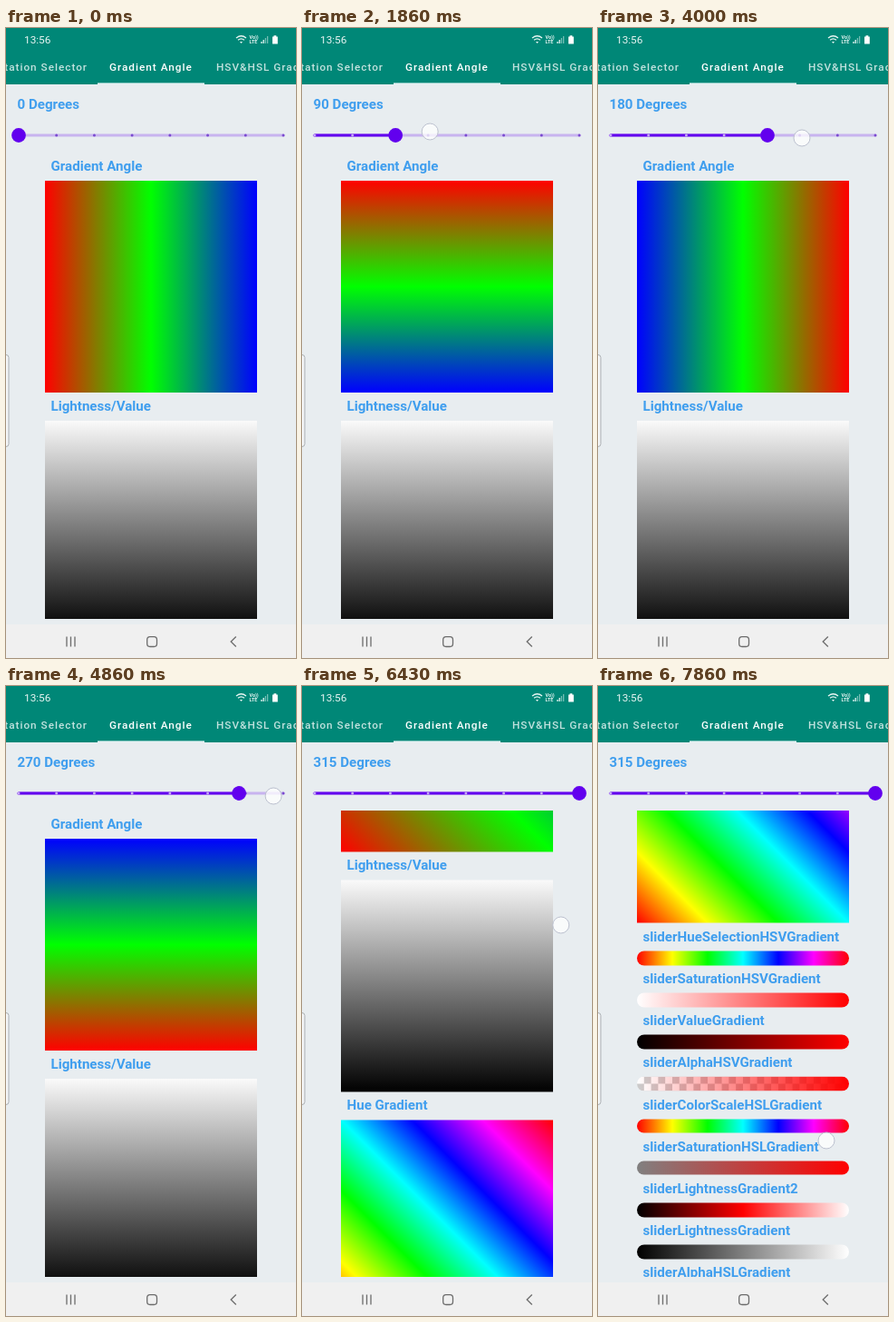
An HTML page that plays this animation: 320x693 px, repeating every 8 s.

```html
<!DOCTYPE html>
<html lang="en">
<head>
<meta charset="utf-8">
<title>Gradient Angle</title>
<style>
  html, body { margin: 0; width: 100%; height: 100%; overflow: hidden; background: #e8edf0; }
  body { position: relative; font-family: Roboto, sans-serif; }
  svg { position: absolute; left: 0; top: 0; }
  .tab { font-size: 11.76px; font-weight: 500; letter-spacing: 1px; fill: #fff; }
  .dim { fill-opacity: .76; }
  .title { font-size: 15.12px; font-weight: 700; color: #3f9eee; fill: #3f9eee; }
  #view { position: absolute; left: 0; top: 137px; width: 320px; height: 513px; overflow: hidden; }
  #list { position: absolute; left: 43px; top: 0; width: 234px; }
  #list .title { line-height: 31px; padding-left: 6.5px; white-space: nowrap; }
  .box { height: 233px; }
  .bar { height: 15.6px; margin-bottom: -.45px; border-radius: 8px; }
</style>
</head>
<body>
<svg width="320" height="693">
  <rect width="320" height="62" fill="#008777"/>
  <text x="20" y="17.3" font-size="11.8" fill="#e9f6f4">13:56</text>
  <g fill="none" stroke="#e9f6f4" stroke-width="1.3">
    <path d="M254 11q5.5-4.5 11 0M256 13.3q3.5-2.8 7 0"/>
    <path d="M258 15h3l-1.500 2z" fill="#e9f6f4" stroke="none"/>
    <path d="M282 17v-2M284.2 17v-4"/>
    <path d="M286.4 17v-6M288.6 17v-8" stroke-opacity=".5"/>
  </g>
  <g font-size="5.4" font-weight="700" fill="#e9f6f4">
    <text x="268.5" y="12">Vo))</text>
    <text x="268.5" y="17.3">LTE</text>
  </g>
  <path d="M295.5 8.200h2.800v1.200h1.500v8h-5.800v-8h1.500z" fill="#fff"/>

  <text class="tab dim" x="90" y="47.3" text-anchor="end">Orientation Selector</text>
  <text class="tab" x="114" y="47.3">Gradient Angle</text>
  <text class="tab dim" x="232" y="47.3">HSV&amp;HSL Gradient</text>
  <rect x="101" y="60.4" width="118" height="1.6" fill="#e6f3f4"/>

  <text id="degrees" class="title" x="12.5" y="88.800"></text>
  <g stroke-width="3.1" stroke-linecap="round">
    <path d="M14 118H306" stroke="#c8b4ef"/>
    <path id="active" stroke="#6200ee"/>
  </g>
  <g id="ticks"></g>
  <circle id="thumb" cy="118" r="7.9" fill="#6200ee"/>
  <circle id="halo" cy="118" r="14.5" fill-opacity=".15"/>

  <rect x="-6" y="359.5" width="9" height="101" rx="3" fill="#f4f6f8" stroke="#a9adb0"/>
  <rect y="656" width="320" height="37" fill="#f0f0f0"/>
  <g fill="none" stroke="#6c6c6c" stroke-width="1.3">
    <path d="M67 669.5v11M71.5 669.5v11M76 669.5v11"/>
    <rect x="155.7" y="669.7" width="10.8" height="10.8" rx="3.2"/>
    <path d="M253.8 669.5l-5.6 5.500 5.6 5.500"/>
  </g>
</svg>
<div id="view"><div id="list"></div></div>
<svg width="320" height="693">
  <circle id="finger" r="9" fill="#fff" fill-opacity=".75" stroke="#bcc1cf"/>
</svg>

<script>
const LOOP = 8000, FPS = 7;
const FIRST = 14, LAST = 306, STEP = (LAST - FIRST) / 7;
const SCROLL_END = 833.5, DRAG = 165, LEAD = 38;
const $ = id => document.getElementById(id);

const hues = 'red, yellow, lime, cyan, blue, magenta, red';
const across = colors => `linear-gradient(90deg, ${colors})`;
const alpha = across('#f000, #f00') +
  ', repeating-conic-gradient(#ccc 0 25%, #fff 0 50%) 0 0 / 15.6px 15.6px';

function addItem(name, kind, background = '') {
  $('list').insertAdjacentHTML('beforeend',
    `<div class="title">${name}</div><div class="${kind}" style="background:${background}"></div>`);
  return $('list').lastElementChild;
}

const angleBox = addItem('Gradient Angle', 'box');
addItem('Lightness/Value', 'box', 'linear-gradient(#fafafa, #000)');
const hueBox = addItem('Hue Gradient', 'box');
const bars = {
  sliderHueSelectionHSVGradient: across(hues),
  sliderSaturationHSVGradient: across('#fff, red'),
  sliderValueGradient: across('#000, red'),
  sliderAlphaHSVGradient: alpha,
  sliderColorScaleHSLGradient: across(hues),
  sliderSaturationHSLGradient: across('gray, red'),
  sliderLightnessGradient2: across('#000, red, #fff'),
  sliderLightnessGradient: across('#000, #fff'),
  sliderAlphaHSLGradient: alpha,
  'Slider RGB Red': across('#000, red'),
  'Slider RGB Green': across('#000, lime'),
  'Slider RGB Blue': across('#000, blue'),
};
for (const name in bars) addItem(name, 'bar', bars[name]);

const ticks = Array.from({ length: 8 }, (_, i) => {
  const tick = document.createElementNS('http://www.w3.org/2000/svg', 'circle');
  set(tick, { cx: FIRST + i * STEP, cy: 118, r: 1.5 });
  return $('ticks').appendChild(tick);
});

function set(element, attributes) {
  for (const name in attributes) element.setAttribute(name, attributes[name]);
}

const ramp = (t, from, to) => Math.min(1, Math.max(0, (t - from) / (to - from)));
const smooth = k => k * k * (3 - 2 * k);

// Two short drags, then a long accelerating one.
const thumbX = t => FIRST + 76 * ramp(t, 770, 1430) + 52 * ramp(t, 1710, 2290) +
  (LAST - 142) * ramp(t, 2570, 5300) ** 2;

// A fling to the end of the list, then a drag back.
const dragBack = t => DRAG * ramp(t, 7140, 7857);
const scrollY = t => SCROLL_END * smooth(ramp(t, 6140, 7000)) - dragBack(t);

// The finger runs ahead of the thumb once a drag has started.
function fingerAt(t) {
  const within = (from, to) => t >= from && t < to;
  if (within(428, 2500)) return [thumbX(t) + LEAD * ramp(t, 428, 770), 114];
  if (within(2850, 5500)) return [thumbX(t) + LEAD * ramp(t, 2570, 3140), 121];
  if (within(5995, 6900)) {
    const k = ramp(t, 6000, 6570);
    return [291 - 7 * k, 387 - DRAG * k];
  }
  if (t >= 7140) return [264 - 12 * ramp(t, 7140, 7857), 335 + dragBack(t)];
}

function draw(t) {
  const x = thumbX(t), finger = fingerAt(t);
  const degrees = Math.round((x - FIRST) / STEP) * 45;
  $('degrees').textContent = degrees + ' Degrees';
  set($('active'), { d: `M${FIRST} 118H${x}` });
  set($('thumb'), { cx: x });
  set($('halo'), { cx: x, visibility: t > 2560 && t < 2850 ? 'visible' : 'hidden' });
  ticks.forEach((tick, i) =>
    set(tick, { fill: FIRST + i * STEP <= x ? '#c4a6f6' : '#7a4bcf' }));

  angleBox.style.background = `linear-gradient(${90 + degrees}deg, red, lime, blue)`;
  hueBox.style.background = `linear-gradient(${90 + degrees}deg, ${hues})`;
  $('list').style.transform = `translateY(${-scrollY(t)}px)`;

  set($('finger'), { visibility: finger ? 'visible' : 'hidden' });
  if (finger) set($('finger'), { cx: finger[0], cy: finger[1] });
}

const start = performance.now();
function tick() {
  const t = (performance.now() - start) % LOOP;
  // The screen refreshes seven times a second.
  draw(Math.floor((t + 6) * FPS / 1000) * 1000 / FPS);
  requestAnimationFrame(tick);
}
tick();
</script>
</body>
</html>
```
